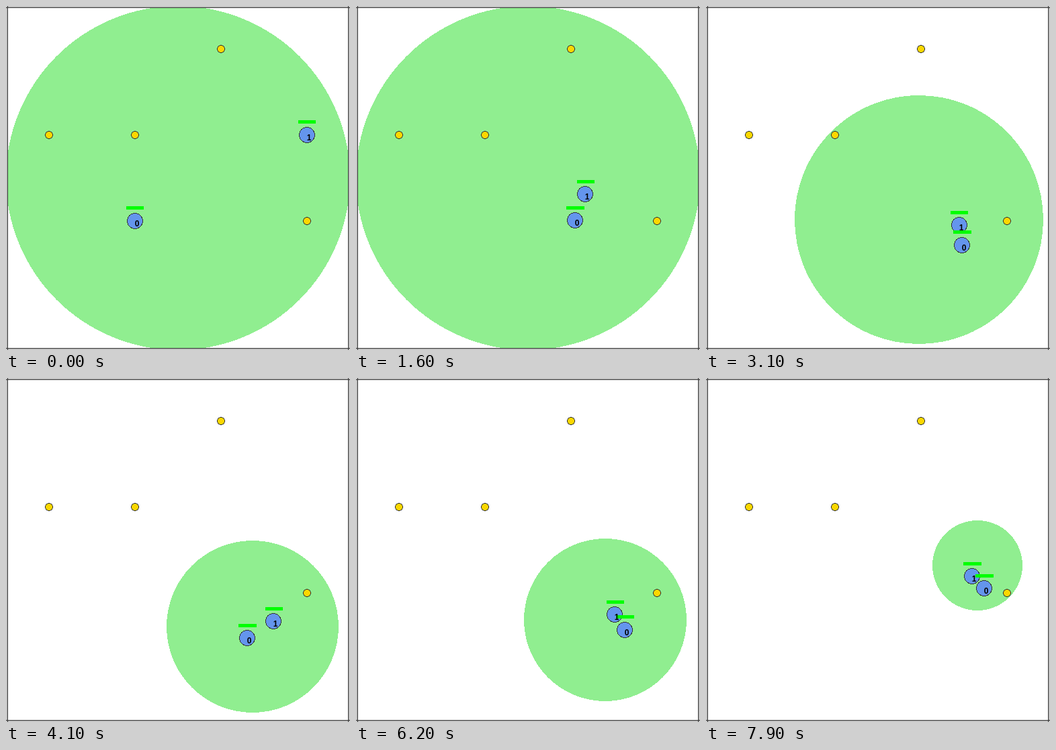
Recreate the animation shown at these times as an HTML page. Size 512x512 px, loop 8000 ms.

```html
<!DOCTYPE html>
<html lang="en">
<head>
<meta charset="utf-8">
<title>Shrinking zone</title>
<style>
  html, body { margin: 0; width: 100%; height: 100%; overflow: hidden; background: #fff; }
  svg { display: block; width: 100vw; height: 100vh; }
  circle, rect { shape-rendering: crispEdges; }
  text { font: bold 12px "Liberation Sans", Arial, sans-serif; text-anchor: middle; }
</style>
</head>
<body>
<svg id="stage" viewBox="0 0 512 512">
  <clipPath id="field"><rect x="2" y="2" width="508" height="508"/></clipPath>
  <rect width="512" height="512" fill="#c0c0c0"/>
  <g clip-path="url(#field)">
    <rect width="512" height="512" fill="#fff"/>
    <circle id="zone" fill="#90ee90"/>
  </g>
  <path d="M0 2.5H512M0 509.5H512M2.5 0V512M509.5 0V512" stroke="#333"/>
</svg>
<script>
const LOOP = 8000, STEP = 100, SHRINK = 2000;
const stage = document.getElementById('stage');
const zone = document.getElementById('zone');

function set(node, attrs) {
  for (const key in attrs) node.setAttribute(key, attrs[key]);
}

function add(tag, attrs, label = '') {
  const node = document.createElementNS('http://www.w3.org/2000/svg', tag);
  set(node, attrs);
  node.textContent = label;
  stage.append(node);
  return node;
}

const mix = (a, b, k) => a.map((v, i) => v + (b[i] - v) * k);

// The zone halves its radius in two linear shrinks.
const centers = [[256, 256], [367.1, 370.1], [406.9, 274.7]];

function zoneAt(t) {
  const i = t < 6000 ? 0 : 1;
  const k = Math.min(1, Math.max(0, (t - 2000 - 4000 * i) / SHRINK));
  const [cx, cy] = mix(centers[i], centers[i + 1], k).map(Math.floor);
  return { cx, cy, r: Math.floor((256 >> i) * (1 - k / 2)) };
}

// Both bots turn at the same moments and walk straight in between.
const turns = [0, 900, 1600, 3100, 4100, 4500, 5400, 6800, 7900];
const routes = [
  [[192, 320], [306, 349], [326.4, 319.6], [381.4, 356.4], [359.4, 387.6],
   [359, 424], [414.4, 397.6], [389.4, 358.6], [414.4, 313.6]],
  [[448, 192], [416, 232], [341.6, 280.6], [377, 326.6], [398.6, 362.6],
   [403, 373], [409.4, 371.6], [367.6, 338.6], [396.4, 295.6]]
];

function botAt(route, t) {
  const i = Math.max(1, turns.findIndex(turn => turn >= t));
  return mix(route[i - 1], route[i], (t - turns[i - 1]) / (turns[i] - turns[i - 1]));
}

for (const [cx, cy] of [[64, 192], [192, 192], [320, 64], [448, 320]])
  add('circle', { cx, cy, r: 5.5, fill: 'gold', stroke: '#333' });

const bodies = routes.map(() => add('circle', { r: 11.5, fill: '#6495ed', stroke: '#333' }));
const bars = routes.map(() => add('rect', { height: 5, fill: '#0f0' }));
const labels = routes.map((_, i) => add('text', {}, i));

function draw(t) {
  set(zone, zoneAt(t));
  routes.forEach((route, i) => {
    const [x, y] = botAt(route, t);
    const cx = Math.floor(x), cy = Math.floor(y), left = Math.round(x) - 13;
    set(bodies[i], { cx, cy });
    set(bars[i], { x: left, y: Math.round(y) - 22, width: Math.ceil(x) + 13 - left });
    set(labels[i], { x: cx + 3, y: cy + 8 });
  });
}

const start = performance.now();
function tick() {
  const t = (performance.now() - start) % LOOP;
  draw(Math.floor(t / STEP) * STEP);
  requestAnimationFrame(tick);
}
draw(0);
requestAnimationFrame(tick);
</script>
</body>
</html>
```
